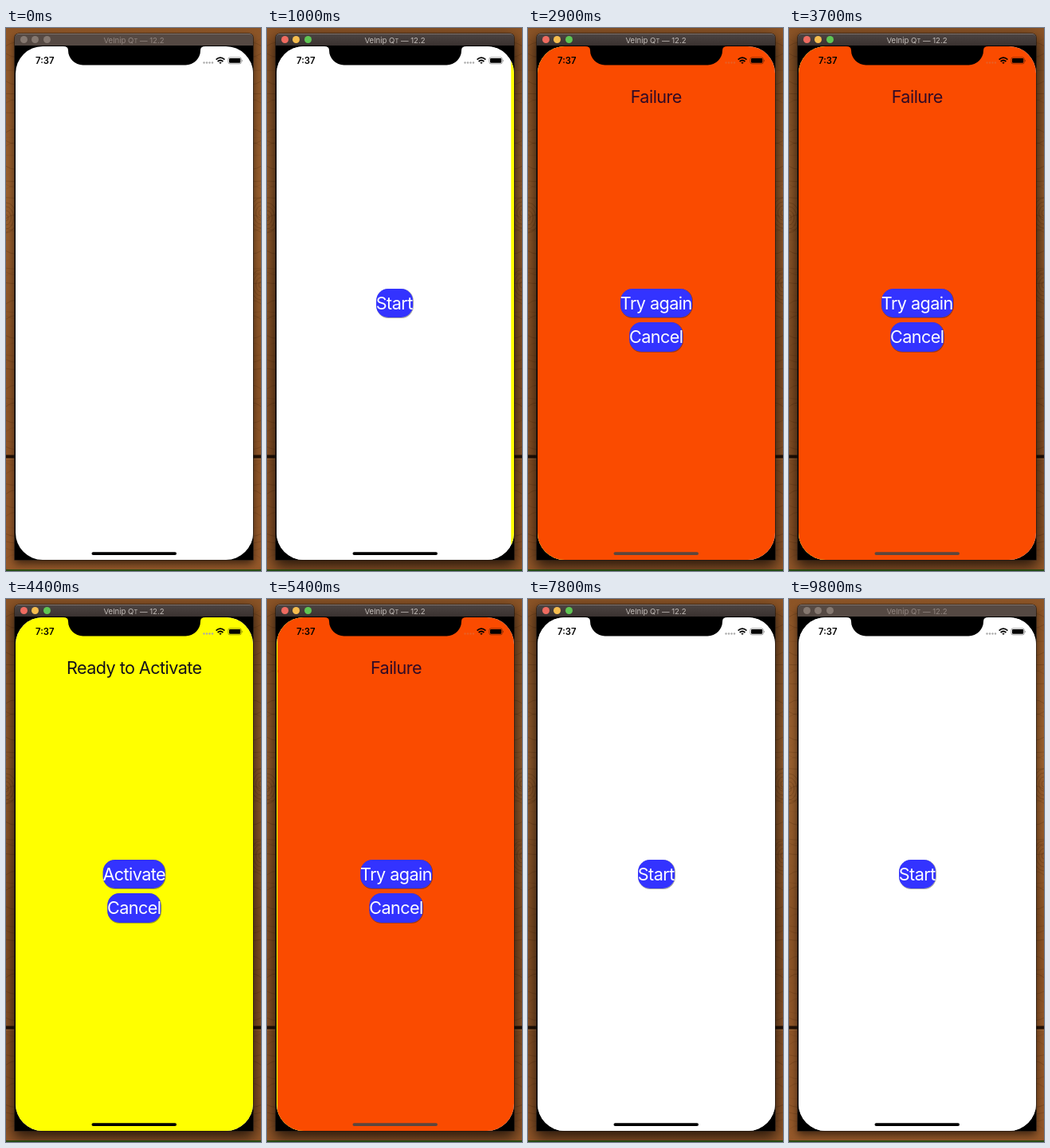
These frames come from a looping animation (320x681 px, 9.9 s). An HTML page:

```html
<!DOCTYPE html>
<html lang="en">
<head>
<meta charset="utf-8">
<title>Activation flow</title>
<style>
html, body { margin: 0; width: 100%; height: 100%; overflow: hidden; }
body, #stage, #stage * { box-sizing: border-box; }
#stage { position: relative; width: 320px; height: 681px; overflow: hidden; background: #8f5729;
  font-family: Inter, "Open Sans", sans-serif; font-optical-sizing: none; }
#stage div, #stage > svg { position: absolute; }
#wood { left: 0; top: 0; }
#window { left: 11px; top: 7px; width: 299px; height: 660px; border-radius: 5px 5px 0 0; background: #000;
  box-shadow: 0 0 0 .6px #1c1714, 0 5px 11px #0009; }
.active#window { box-shadow: 0 0 0 .6px #1c1714, 0 7px 18px 2px #000b; }
#bar { left: 0; top: 0; width: 100%; height: 15px; border-radius: 5px 5px 0 0; background: #554943;
  color: #91857f; font-size: 9.6px; line-height: 16px; text-align: center; border-top: .6px solid #7d716b; }
.active #bar { background: linear-gradient(#4b4341, #3a3230); color: #c2bcb8; }
#bar small { font-size: 7.4px; }
.light { top: 3px; width: 9px; height: 9px; border-radius: 50%; background: #857870; }
.active .light { background: var(--lit); }
#screen { left: 12px; top: 22.5px; width: 297.5px; height: 644.5px; border-radius: 34px; overflow: hidden; background: #fff; }
.page { inset: 0; font-size: 21.6px; letter-spacing: -.55px; }
.heading { top: 48px; width: 100%; line-height: 30px; text-align: center; color: #12101c; }
.failure .heading { color: #310b26; }
.button { left: 50%; transform: translateX(-50%); height: 36.5px; line-height: 37.5px; border-radius: 15px;
  background: #33f; color: #fff; white-space: nowrap; box-shadow: .5px .5px 0 .4px #2226; }
#overlay { left: 0; top: 0; }
</style>
</head>
<body>
<div id="stage">
  <svg id="wood" width="320" height="681">
    <defs>
      <linearGradient id="plank" x2="0" y2="1">
        <stop stop-color="#8d5527"/><stop offset=".3" stop-color="#9a602e"/>
        <stop offset=".6" stop-color="#8c5426"/><stop offset="1" stop-color="#96592a"/>
      </linearGradient>
    </defs>
    <rect width="320" height="681" fill="url(#plank)"/>
    <g id="grain" fill="none" stroke="#4b280d"></g>
    <path d="M0 537.5H320" stroke="#241206" stroke-width="4"/>
    <path d="M0 540.5H320" stroke="#a66d3a" stroke-width="1"/>
  </svg>
  <div id="window">
    <div id="bar">Velnip Q<small>T</small> — 12.2</div>
    <div class="light" style="left:6.5px;--lit:#ee6b60"></div>
    <div class="light" style="left:21.3px;--lit:#f5bd4e"></div>
    <div class="light" style="left:36px;--lit:#5fc653"></div>
  </div>
  <div id="screen"></div>
  <svg id="overlay" width="320" height="681">
    <path d="M72 22H250V23Q244 23 244 28A18.5 18.5 0 0 1 225.5 46.5H96.5A18.5 18.5 0 0 1 78 28Q78 23 72 23Z"/>
    <text x="37" y="44.6" font-size="11.3" font-weight="600" textLength="">7:37</text>
    <g id="dots" fill="#aaa">
      <circle cx="248.5" cy="43.5" r="1.2"/><circle cx="252" cy="43.5" r="1.2"/>
      <circle cx="255.5" cy="43.5" r="1.2"/><circle cx="259" cy="43.5" r="1.2"/>
    </g>
    <g fill="none" stroke="#000" stroke-width="1.7">
      <path d="M263.6 39.6Q269 34.8 274.4 39.6M265.6 42Q269 39 272.4 42"/>
      <path d="M267.3 43.3Q269 42 270.7 43.3L269 45Z" fill="#000" stroke="none"/>
    </g>
    <rect x="278.9" y="36.9" width="16.4" height="8" rx="2.2" fill="none" stroke="#0007" stroke-width=".8"/>
    <rect x="280" y="38" width="14.2" height="5.8" rx="1.2"/>
    <path d="M296.2 39.5Q297.8 41 296.2 42.5Z" fill="#0008"/>
    <rect id="home" x="107.5" y="657.2" width="106.5" height="3.7" rx="1.85"/>
    <path d="M0 680H320" stroke="#0b4a0c" stroke-width="1.6"/>
  </svg>
</div>
<script>
const LOOP = 9900, SLIDE = 600, WIDTH = 297.5;
const START = 0, READY = 1, FAILURE = 2;
const $ = id => document.getElementById(id);

const pageSpecs = [
  ['start', '#fff', '', ['Start']],
  ['ready', '#ff0', 'Ready to Activate', ['Activate', 'Cancel']],
  ['failure', '#fa4b00', 'Failure', ['Try again', 'Cancel']],
];
const pages = pageSpecs.map(([name, color, heading, buttons]) => {
  const page = document.createElement('div');
  page.className = 'page ' + name;
  page.style.background = color;
  page.innerHTML = `<div class="heading">${heading}</div>` + buttons.map((label, i) =>
    `<div class="button" style="top:${304 + i * 42.5}px">${label}</div>`).join('');
  $('screen').append(page);
  return page;
});

// [time, from, to]
const moves = [
  [0, START, START], [1000, START, READY], [2250, READY, FAILURE],
  [3750, FAILURE, READY], [4900, READY, FAILURE], [6600, FAILURE, START],
];

let grain = '';
for (let i = 0; i < 76; i++) {
  const y = i * 9 + 5 * Math.sin(i * 7.3), bend = 5 * Math.sin(i * 2.1);
  grain += `<path d="M0 ${y}q6 ${bend} 12 ${bend}H308q6 0 12 ${-bend}" opacity="${.14 + .12 * Math.sin(i * 3.7)}"/>`;
}
for (const [x, y] of [[0, 238], [320, 232], [320, 322]])
  for (let r = 4; r < 20; r += 5)
    grain += `<ellipse cx="${x}" cy="${y}" rx="${r * .7}" ry="${r}" opacity=".28"/>`;
$('grain').innerHTML = grain;

function draw(t) {
  $('window').className = t >= 200 && t < 8000 ? 'active' : '';
  const [begin, from, to] = moves.findLast(move => move[0] <= t);
  const age = t - begin;
  const k = age >= SLIDE ? 1 : 1 - Math.exp(-age / 91);
  const top = Math.max(from, to);
  pages.forEach((page, i) => {
    const shown = i === to ? k : 1 - k;
    const x = i === top ? (1 - shown) * WIDTH : (shown - 1) * WIDTH * .3;
    page.style.visibility = i === from || i === to ? 'visible' : 'hidden';
    page.style.transform = `translateX(${x}px)`;
  });
  const failed = to === FAILURE ? k : from === FAILURE ? 1 - k : 0;
  $('home').style.fill = `rgb(${92 * failed},${70 * failed},${62 * failed})`;
  $('dots').style.opacity = 1 - .8 * failed;
}

function tick() {
  draw(performance.now() % LOOP);
  requestAnimationFrame(tick);
}
tick();
</script>
</body>
</html>
```
